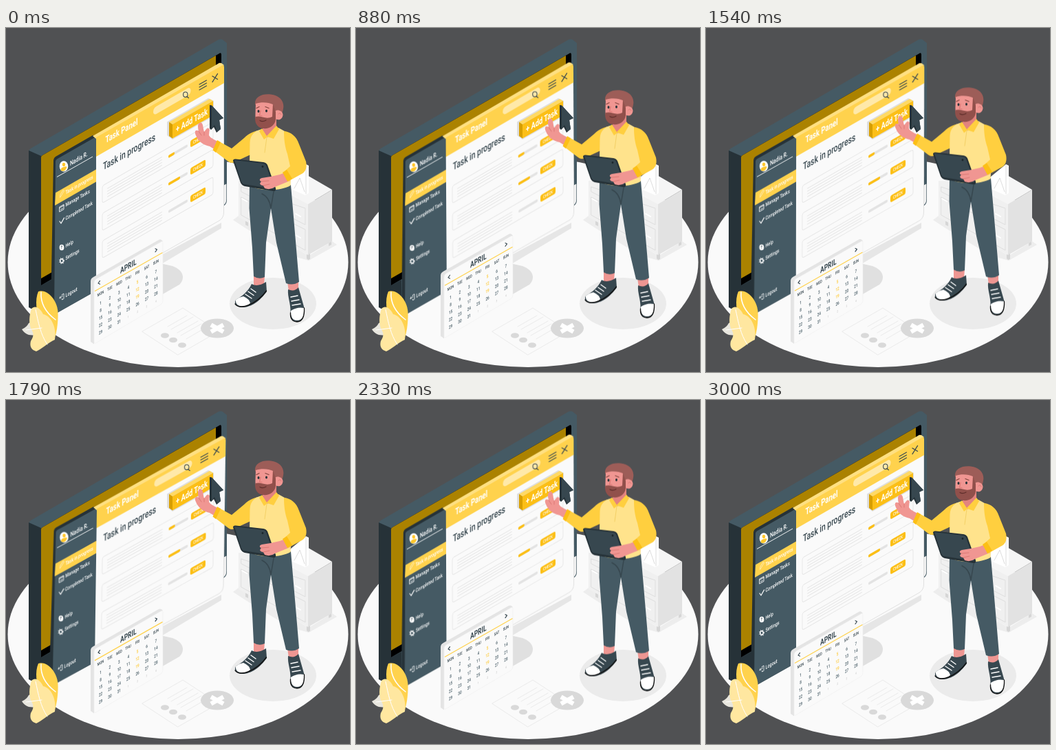
Write an HTML page that moves like this. It is 500 px wide and 500 px high and loops after 3040 ms.

```html
<!DOCTYPE html>
<html lang="en">
<head>
<meta charset="utf-8">
<title>Task panel</title>
<style>
html, body { margin: 0; width: 100%; height: 100%; overflow: hidden; background: #505153; }
svg { display: block; width: 100%; height: 100%; }
text { font-family: Roboto, "Liberation Sans", sans-serif; font-weight: 500; }
.bold { font-weight: 700; }
.mid { text-anchor: middle; }
.line { fill: none; stroke-linecap: round; stroke-linejoin: round; }

#panel { transform-origin: 191px 233px; animation: sway 3040ms linear infinite; }
#calendar { animation: bob 3040ms linear infinite; }
#man { animation: rise 3040ms linear infinite; }

/* Each cycle fills 3000 ms, then rests for 40 ms. */
@keyframes sway {
  0%, 98.684%, 100% { transform: rotate(0deg); }
  12.336%, 61.678% { transform: rotate(1deg); }
  37.007%, 86.349% { transform: rotate(-1deg); }
}
@keyframes bob {
  0%, 49.342%, 98.684%, 100% { transform: translateY(0); }
  24.671%, 74.013% { transform: translateY(-10px); }
}
@keyframes rise {
  0%, 98.684%, 100% { transform: translateY(0); }
  49.342% { transform: translateY(-10px); }
}
</style>
</head>
<body>
<svg viewBox="0 0 500 500" xmlns="http://www.w3.org/2000/svg">
  <ellipse cx="250" cy="340.500" rx="247.500" ry="152.500" fill="#fafafa"/>

  <!-- floor shadows -->
  <g fill="#e6e6e6">
    <path d="M226 330L313 283V291L226 343Z"/>
    <path d="M224 342L242 346C258 352 261 364 252 373L224 389Z" fill="#e0e0e0"/>
    <ellipse cx="388" cy="400.500" rx="63" ry="37.500" fill="#ebebeb"/>
    <path d="M330 279L338 273L440 331L474 310L481 315L440 338L412 330L350 292Z" fill="#ededed"/>
  </g>

  <!-- paper and disc -->
  <g class="line" stroke="#ebebeb">
    <path d="M198 441L257 407L309 441L250 475Z"/>
    <path d="M235 434L263 418M240 438L272 420M249 443L279 426M254 447L284 430M262 452L291 435"/>
  </g>
  <g fill="#d9d9d9">
    <ellipse cx="231" cy="447" rx="6" ry="3.800"/>
    <ellipse cx="243" cy="453.500" rx="6" ry="3.800"/>
    <ellipse cx="256" cy="461" rx="6" ry="3.800"/>
    <ellipse cx="307" cy="436.500" rx="24" ry="14"/>
  </g>
  <path d="M298 431.500L316 441.500M316 431.500L298 441.500" stroke="#fff" stroke-width="6.500"/>

  <!-- cabinet -->
  <path d="M348 280h4v8l-4-2ZM437 328h5v8l-3 1-2-2ZM469 308h4v7l-4 2Z" fill="#d6d6d6"/>
  <path d="M380 222L436 213L474 235L439 256Z" fill="#f5f5f5"/>
  <path d="M338 222L380 224L439 256V330L338 275Z" fill="#f0f0f0"/>
  <path d="M439 256L474 235V310L439 330Z" fill="#e2e2e2"/>
  <path class="line" d="M342 231L435 262V286L342 238ZM342 246L435 293V323L342 272Z" stroke="#dedede"/>
  <path class="line" d="M343 248L350 252M421 270L428 274M421 301L428 305" stroke="#fff" stroke-width="2"/>
  <path d="M414 216L436 198L440 200V240L435 243L414 234Z" fill="#fff"/>
  <path class="line" d="M436 199V241M419 233L427 218L434 238" stroke="#dcdcdc"/>

  <!-- monitor -->
  <path d="M33 180Q33 177 36 175L307 18Q311 15 315 17L321 22V250Q321 256 316 259L46 413L33 405Z" fill="#455a64"/>
  <path d="M33 178L51 186V409L46 413L33 406Z" fill="#263238"/>
  <path d="M51 374L66 366V402L46 413Z" fill="#263238"/>
  <path d="M51 188Q51 186 53 185L310 37Q313 35 313 39V224L51 374Z" fill="#000"/>
  <path d="M51 188Q51 186 53 185L305 40V218L51 364Z" fill="#ab8200"/>
  <path d="M314 230L320.300 226.500V249Q320.300 255 316 257.500L314 258.500Z" fill="#f0f0f0"/>

  <g id="panel">
    <path d="M69 192Q69 189 72 187L126 156L131 157V382L69 417Q65 418 65 412Z" fill="#263238"/>
    <path d="M72 194Q72 192 74 190.500L131 158V382L70 416.500Z" fill="#455a64"/>
    <path d="M131 185L317 79V268Q317 276 310 280L131 382Z" fill="#fafafa"/>
    <path class="line" d="M316.500 80V268Q316.500 276 310 280L131 382" stroke="#e0e0e0"/>
    <path d="M126 157L308 52Q310 50 313 51L317 54L131 161Z" fill="#ffe082"/>
    <path d="M131 159L314 54.500Q317 53 317 57V80L131 187Z" fill="#ffd24d"/>
    <rect x="0" y="-5.500" width="63" height="11" rx="5.500" transform="matrix(.866 -.5 0 1 214 122)" fill="#ffe9a9"/>
    <g class="line" stroke="#37474f" stroke-width="1.100">
      <ellipse cx="260.800" cy="96.700" rx="3.200" ry="3.700"/>
      <path d="M263 99.700L265.500 101.700M281 82L291.500 76M281 86L291.500 80M281 90L291.500 84"/>
      <path d="M300 70L307.500 74.500M300 78.500L307.500 66.500" stroke-width="1.400"/>
    </g>
    <path d="M72 239.500L131 205.500V223.500L71 258Z" fill="#ffd24d"/>
    <path d="M74 216.500L126 187" stroke="#fff" stroke-width=".9"/>
    <ellipse cx="84" cy="201" rx="6.300" ry="7.800" fill="#fff"/>
    <ellipse cx="84" cy="198.500" rx="2.200" ry="2.800" fill="#ffc72c"/>
    <path d="M79.500 206.500Q80 202.500 84 202Q88 200.500 88.500 202Q87 207.500 83 208Q80.500 208 79.500 206.500Z" fill="#ffc72c"/>
    <g class="line" stroke="#fff">
      <path d="M78.500 246L79 242L83 235.500L84.500 236.500L80.500 243.500Z" stroke="#fff0bd" stroke-width=".8"/>
      <path d="M78 260L84 256.500V263.500L78 267ZM78 261.500L84 258M79.500 264L82.500 262.200" stroke-width=".9"/>
      <path d="M78 281L80 284L84.500 276" stroke-width="1.200"/>
      <ellipse cx="81" cy="338.500" rx="2.200" ry="2.700" stroke-width="1.400"/>
      <ellipse cx="81" cy="338.500" rx="3.300" ry="4" stroke-width="1.400" stroke-dasharray="1 2" stroke-linecap="butt"/>
      <path d="M81.500 389V387.500L84 386V393.500L81.500 395V393.500M78 392.500L82 390.200M79.200 390L78 392.500L79.200 393" stroke-width=".8"/>
    </g>
    <ellipse cx="81" cy="319" rx="3.400" ry="4.300" fill="#fff"/>
    <g id="cards"></g>
    <g id="words"></g>
  </g>

  <!-- add button and pointer -->
  <path d="M234 136.500L294 102L302 106V128L242 162L234 156Z" fill="#dedede"/>
  <path d="M237 136.800L296 103L301 106L242 140Z" fill="#ffd964"/>
  <path d="M237 136.800L242 140V160.500L237 157Z" fill="#d79f00"/>
  <path d="M242 140L301 106V127L242 160.500Z" fill="#fcbf16"/>
  <g id="button"></g>
  <path d="M296 112L299 112.500L316 131L310 134L312 147L306 152L302 144L298 148L296 146Z" fill="#263238"/>
  <path d="M299 112.500L316 131L310 133L312 147L307 150L303 141L299 146Z" fill="#37474f"/>

  <!-- leaves -->
  <path d="M47 383C58 379 74 393 75.500 413C76 430 73 448 69 454L52 430C43 414 42 394 47 383Z" fill="#ffd24d"/>
  <path class="line" d="M51 384C50 400 57 413 72 424" stroke="#fff" stroke-width="1.500"/>
  <path d="M23 438Q30 435 33 429L42 425L44 447L33 446Q27 444 23 438Z" fill="#e8e6de"/>
  <path d="M37 408C42 402 50 407 54 416C65 418 74 434 71 453C62 457 50 468 44 470C37 468 34 463 36 455C39 450 41 446 38 440C32 431 34 417 37 408Z" fill="#ffe7a0"/>
  <path class="line" d="M43 409C47 428 50 445 60 460M29 439L52 436" stroke="#fff"/>

  <g id="calendar">
    <path d="M123 368Q123 364 127 362L222 308Q225 306 228 310L133 372L128 459.500L123 456Z" fill="#e4e4e4"/>
    <path d="M128 371Q128 367 131 365L225 311Q228 309 228 313V396Q228 400 225 402L132 457Q128 460 128 456Z" fill="#fafafa" stroke="#efefef" stroke-width=".6"/>
    <path d="M129 382.500L227.500 326.500" stroke="#ffd24d" stroke-width="1.200"/>
    <path class="line" d="M136.500 367.500L134 371L136.500 372.300M217 320.800L219.500 322L217 325.500" stroke="#37474f" stroke-width="1.200"/>
    <g id="days"></g>
  </g>

  <g id="man">
    <!-- legs and shoes -->
    <path d="M360 360H376L375 374L360 375ZM409 369H425V381L411 383Z" fill="#ee9692"/>
    <path d="M357 372Q366 377 378 369L379 383C372 393 360 405 345 406C334 406 331 401 334 395C343 390 352 383 357 372Z" fill="#37474f"/>
    <path d="M334 395Q339 391 345 390Q354 394 355 400Q350 405 344 404.500Q333 404 334 395Z" fill="#fff"/>
    <path class="line" d="M333 401C336 406 345 406 352 403C362 399 372 391 378.500 382" stroke="#111" stroke-width="1.400"/>
    <path d="M410 380Q419 384 425 377L433 405C435 419 431 427 423 427C415 427 413 421 413.500 413C414 400 409 391 410 380Z" fill="#37474f"/>
    <path d="M414 411Q423 405 433 407C434 419 430 425 423 425C416 425 413.500 419 414 411Z" fill="#fff"/>
    <path class="line" d="M413.500 414C413 422 416 427 423 427C431 427 434 419 433.500 407" stroke="#111" stroke-width="1.300"/>
    <path class="line" d="M356 379L363 384M352 383L360 388.500M348 387L357 393M414 391L424 389M415 397L426 395M416 403L428 401" stroke="#fff" stroke-width="1.400"/>
    <path d="M354 228L353.500 262L358 320L360 361Q368 366 376 362L378 312L385 262L393 312L407 371Q417 375 426 369L421 310L414 228Z" fill="#455a64"/>
    <path class="line" d="M385 262Q383 246 372 241M385 262L389 238" stroke="#37474f" stroke-width="1.500"/>

    <!-- pointing arm -->
    <path d="M309 180L296 172C286 170 279 164 276 156C273 150 276 147 280 150C278 143 279 137 283 137.500C287 138 286 145 288 151L291 147C294 144 297 146 295.500 150L295 156C298 161 303 162 312 167Z" fill="#f09692"/>
    <path class="line" d="M280 150L284 156M288 151L288 156" stroke="#db7975"/>
    <path d="M372 148C361 150 354 152 346 160L328 175L310 165L302 178L323 194Q328 198 334 194L362 181Z" fill="#ffcf3f"/>
    <path d="M307 163L312 166L305 181L300.500 177.500Z" fill="#fcbf16"/>

    <!-- body -->
    <path d="M372 147C362 149 355 155 354.500 166L353.500 229C371 238 399 237 413.500 229L416 190L414 155L396 145Z" fill="#ffe38c"/>
    <path d="M373 140L393 130V148L380 159L373 150Z" fill="#e2837f"/>
    <path d="M372 146L379 157L393 142L397 147L389 161L380 158L375 162L368 150Z" fill="#ffcf3f"/>
    <path class="line" d="M379 159L376 181" stroke="#f2ce63" stroke-width=".9"/>

    <!-- head -->
    <path d="M362 111C361 100 372 95 385 96.500C398 98 405 107 403 117C402 125 398 130 391 132L370 120Z" fill="#9d5d58"/>
    <path d="M363 110C371 107 382 108 388 111L391 121C393 118 402 119 402.500 126C402 133 396 135 392 132C392 139 384 145 376 145C365 145 362 135 362.500 124Z" fill="#f09692"/>
    <path d="M388 110L392 122L392 133C391 142 382 147 374 146C364 145 361 136 362.500 129Q368 128 373 129.500Q381 132 387 129Z" fill="#91504b"/>
    <path class="line" d="M370 120L368.500 127L372 127.500" stroke="#db7975" stroke-width="1.200"/>
    <path class="line" d="M369 134.500Q373 137 378 134" stroke="#5e2e2b" stroke-width="1.200"/>
    <ellipse cx="367" cy="121" rx="1.500" ry="1.900" fill="#263238"/>
    <ellipse cx="378.500" cy="120.500" rx="1.500" ry="1.900" fill="#263238"/>
    <path class="line" d="M364 116.500L368 114.500M377 114.500L382 116.500" stroke="#84463f" stroke-width="1.300"/>
    <path class="line" d="M396 125Q399 122 400 126" stroke="#db7975"/>

    <!-- tablet and holding arm -->
    <path d="M330 193Q330 190 334 190.500L374 195Q378 195.500 380 199L392 233Q393 238 388 237L347 230Q343 229 341 225Z" fill="#263238"/>
    <path d="M332 192L374 197Q377 197.500 378 200L390 234L346 227Q343 226 342 223Z" fill="#37474f"/>
    <circle cx="373" cy="201.500" r="1.400" fill="#1c262b"/>
    <path d="M411 208L398 213C389 215 380 217 372 218C368 219 368 222 371 223L369 226Q370 229 374 229L376 233Q384 236 391 231L413 222Z" fill="#f09692"/>
    <path class="line" d="M371 223L382 222M374 229L383 227" stroke="#db7975"/>
    <path d="M404 150C414 151 422 157 426 169L436 194C438 204 435 210 428 213L410 223L403 210L413 201L409 183C405 172 404 160 404 150Z" fill="#ffcf3f"/>
    <path d="M402 210L408 206L416 219L409 223Z" fill="#fcbf16"/>
  </g>
</svg>
<script>
const NS = "http://www.w3.org/2000/svg";
const SLOPE = 0.577;
const DARK = "#37474f", GOLD = "#fcbf16", TRACK = "#e3e3e3";

function add(id, tag, attrs, content = "") {
  const node = document.createElementNS(NS, tag);
  for (const key in attrs) node.setAttribute(key, attrs[key]);
  node.textContent = content;
  document.getElementById(id).append(node);
}

// Text lying on the upright isometric plane
function label(id, x, y, size, fill, content, cls = "") {
  add(id, "text", {
    transform: `matrix(.7 -.404 0 1 ${x} ${y})`, "font-size": size, fill, class: cls
  }, content);
}

// Rounded bar on the same plane; x, y is its top left corner
function bar(id, x, y, w, h, r, style) {
  add(id, "rect", {
    transform: `matrix(.866 -.5 0 1 ${x} ${y})`, width: w / 0.866, height: h, rx: r, ...style
  });
}

label("words", 144.5, 167.5, 13.7, "#fff", "Task Panel", "bold");
label("words", 141, 206.8, 14.8, DARK, "Task in progress");
label("words", 93, 200.5, 9.8, "#fff", "Nadia R.");
label("words", 79.6, 322, 6.8, DARK, "?", "bold");
const menu = [["Task in progress", 242], ["Manage Tasks", 260], ["Completed Task", 279.5],
  ["Help", 319.5], ["Settings", 337.5], ["Logout", 391.5]];
for (const [name, y] of menu) label("words", 86.5, y, 7.8, "#fff", name);

[9, 17, 0].forEach((done, i) => {
  const top = 229.5 + i * 40;
  const at = (x, dy) => top - (x - 140) * SLOPE + dy;
  bar("cards", 140, top, 161, 25, 3, { fill: "none", stroke: "#e3e3e3", "stroke-width": 0.9 });
  for (let k = 0; k < 4; k++)
    bar("cards", 147, at(147, 7.5 + k * 4), 80, 1, 0.5, { fill: TRACK });
  bar("cards", 236, at(236, 11), 28, 4, 1.8, { fill: TRACK });
  if (done) bar("cards", 236, at(236, 11), done, 4, 1.8, { fill: GOLD });
  bar("cards", 268, at(268, 8), 22, 10, 2.5, { fill: GOLD });
  label("cards", 279, at(279, 15.2), 6.2, "#fff", "CHECK", "mid");
});

label("button", 247, 152, 13.3, "#fff", "+ Add Task", "bold");

label("days", 166, 357, 12, DARK, "APRIL", "bold");
["MON", "TUE", "WED", "THU", "FRI", "SAT", "SUN"].forEach((day, c) => {
  const x = 137.5 + c * 13.4, y = 388 - c * 7.6;
  label("days", x, y, 6, DARK, day, "mid");
  for (let r = 0; r < 5; r++) {
    const n = r * 7 + c + 1;
    const fill = n > 31 ? "#c9c9c9" : c === 4 && r < 3 ? "#ffc72c" : "#455a64";
    label("days", x, y + 14 + r * 10.6, n > 31 ? 4.5 : 6.6, fill, n > 31 ? n - 31 : n, "mid");
  }
});
</script>
</body>
</html>
```
